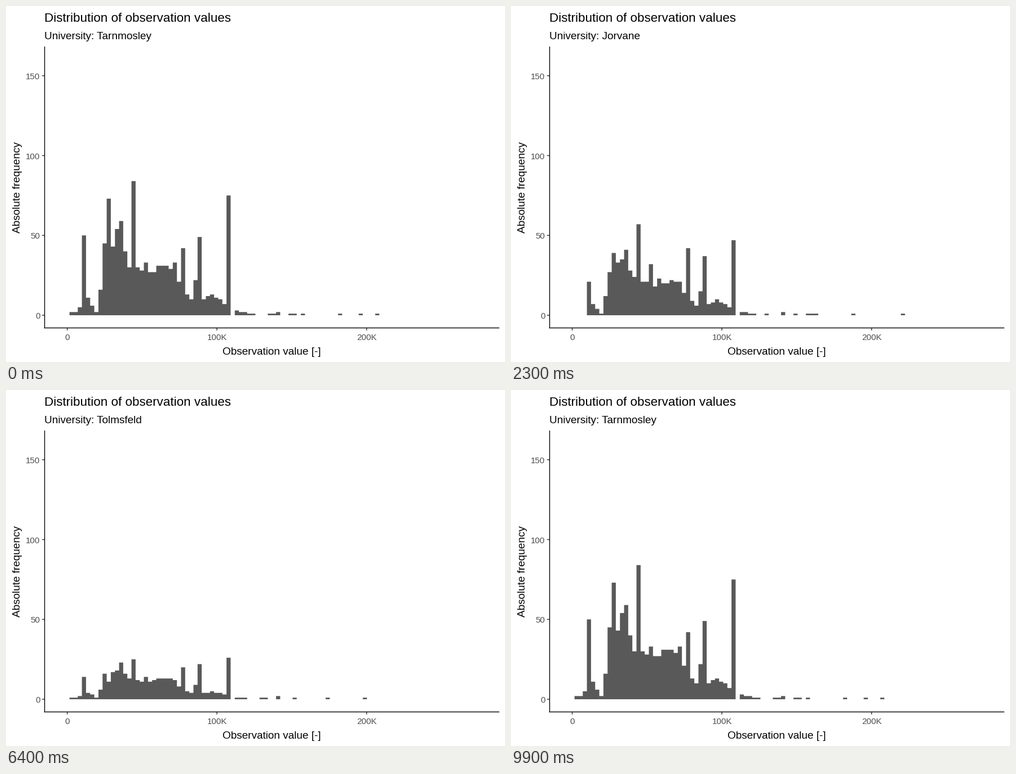
Recreate the animation shown at these times as a matplotlib script. Size 885x632 px, loop 10000 ms.

```python
import matplotlib.pyplot as plt
import numpy as np
from matplotlib.animation import FuncAnimation

W, H, DPI = 885, 632, 100
PT = 72 / DPI                      # points per pixel
BINS = 100
X0, BIN_W = 105.3, 7.327           # left edge of first bin, bin width
Y0, UNIT = 549, 2.835              # zero line, pixels per count
LEFT, RIGHT, TOP, BOTTOM = 68.5, 875, 72, 571.5

plt.rcParams["font.family"] = ["Liberation Sans", "DejaVu Sans"]

# Every histogram is one common body curve, some spikes and a sparse tail.
BODY = [(2, 2), (3, 5), (5, 9), (7, 2), (8, 14), (9, 36), (12, 44), (15, 28),
        (18, 25), (22, 26), (26, 26), (27, 17), (30, 8), (31, 20), (33, 8),
        (35, 12), (38, 6), (40, 0), (41, 2.5), (44, 1), (46, 0)]
SPIKES = [4, 10, 13, 16, 19, 28, 32, 39]
TYPICAL = np.array([26, 49, 51, 71, 40, 53, 46, 59])

# name, first bin, last bin, body scale, spike heights (typical if None)
STATES = [
    ("Tarnmosley", 1, 75, 1.15, [50, 73, 59, 84, 33, 42, 49, 75]),
    ("Quellandia", 1, 73, 1.0, None),
    ("Orvaney", 3, 73, 0.3, [9, 5, 22, 28, 12, 13, 6, 11]),
    ("Jorvane", 4, 80, 0.8, None),
    ("West Pruddlewick", 1, 83, 1.0, None),
    ("Ostenbro", 0, 81, 0.82, [23, 35, 54, 75, 31, 55, 42, 49]),
    ("Ombrana", 1, 99, 1.7, None),
    ("Pelzmoor", 0, 79, 1.0, [12, 58, 40, 68, 67, 46, 44, 58]),
    ("Fenn Quarl", 2, 80, 0.75, None),
    ("Tolmsfeld", 1, 72, 0.45, [14, 11, 23, 25, 14, 20, 22, 26]),
    ("Cobblerstead", 0, 80, 1.1, None),
    ("Wharfenstoke", 1, 71, 1.1, None),
    ("Drizzly Ledge", 2, 81, 0.95, [13, 47, 40, 51, 29, 73, 50, 57]),
    ("North Dravel", 0, 87, 2.0, [52, 98, 102, 142, 80, 106, 92, 160]),
]


def histogram(seed, first, last, scale, spikes):
    rng = np.random.default_rng(seed)
    h = scale * np.interp(np.arange(BINS), *zip(*BODY))
    h = np.round(h * rng.uniform(0.9, 1.1, BINS))
    h[SPIKES] = np.round(scale * TYPICAL) if spikes is None else spikes
    n = int(2 + 5 * scale)
    tail = 47 + (last - 47) * rng.random(n) ** 1.6
    h[tail.astype(int)] = 1
    h[51] = 2
    h[last] = 1
    h[:first] = 0
    h[first] = max(h[first], 1)
    return h


HISTS = [histogram(i, *state[1:]) for i, state in enumerate(STATES)]

# Step at which each state begins; the last one wraps to the first state.
STARTS = np.cumsum([0, 7, 8, 8] + [7] * 3 + [6] + [7] * 7)
BLENDS = STARTS[1:4] - 1           # halfway steps between two states

fig = plt.figure(figsize=(W / DPI, H / DPI), dpi=DPI, facecolor="white")
ax = fig.add_axes([0, 0, 1, 1])
ax.set(xlim=(0, W), ylim=(H, 0))
ax.axis("off")


def line(xs, ys, color="black"):
    ax.plot(xs, ys, color=color, lw=1.4 * PT, solid_capstyle="butt", snap=False)


def text(x, y, s, size, color="black", ha="left", **kw):
    return ax.text(x, y, s, fontsize=size * PT, color=color, ha=ha,
                   va="baseline", **kw)


bars = ax.stairs(np.full(BINS, Y0), X0 + BIN_W * np.arange(BINS + 1),
                 baseline=Y0, fill=True, color="#595959", lw=0, snap=False)

for i, label in enumerate(("0", "100K", "200K")):
    x = 108.6 + 265.5 * i
    line([x, x], [BOTTOM, BOTTOM + 4.6], "#333333")
    text(x, 593, label, 15, "#4D4D4D", "center")
for n in (0, 50, 100, 150):
    y = Y0 - UNIT * n
    line([LEFT - 4.6, LEFT], [y, y], "#333333")
    text(60.5, y + 6, str(n), 15, "#4D4D4D", "right")
line([LEFT, LEFT], [TOP, BOTTOM + 0.7])
line([LEFT - 0.7, RIGHT], [BOTTOM, BOTTOM])

text(LEFT, 28.5, "Distribution of observation values", 22.4)
subtitle = text(LEFT, 59, "", 19)
text((LEFT + RIGHT) / 2, 619, "Observation value [-]", 19, ha="center")
text(25, (TOP + BOTTOM) / 2, "Absolute frequency", 19, ha="center",
     rotation=90, rotation_mode="anchor")


def draw(k):
    s = np.searchsorted(STARTS, k, side="right") - 1
    i = s % len(STATES)
    h = HISTS[i]
    if k in BLENDS:
        h = (h + HISTS[i + 1]) / 2
    bars.set_data(values=Y0 - UNIT * h)
    subtitle.set_text("University: " + STATES[i][0])
    return bars, subtitle


anim = FuncAnimation(fig, draw, frames=100, interval=100, repeat=True,
                     repeat_delay=0)
plt.show()
```
